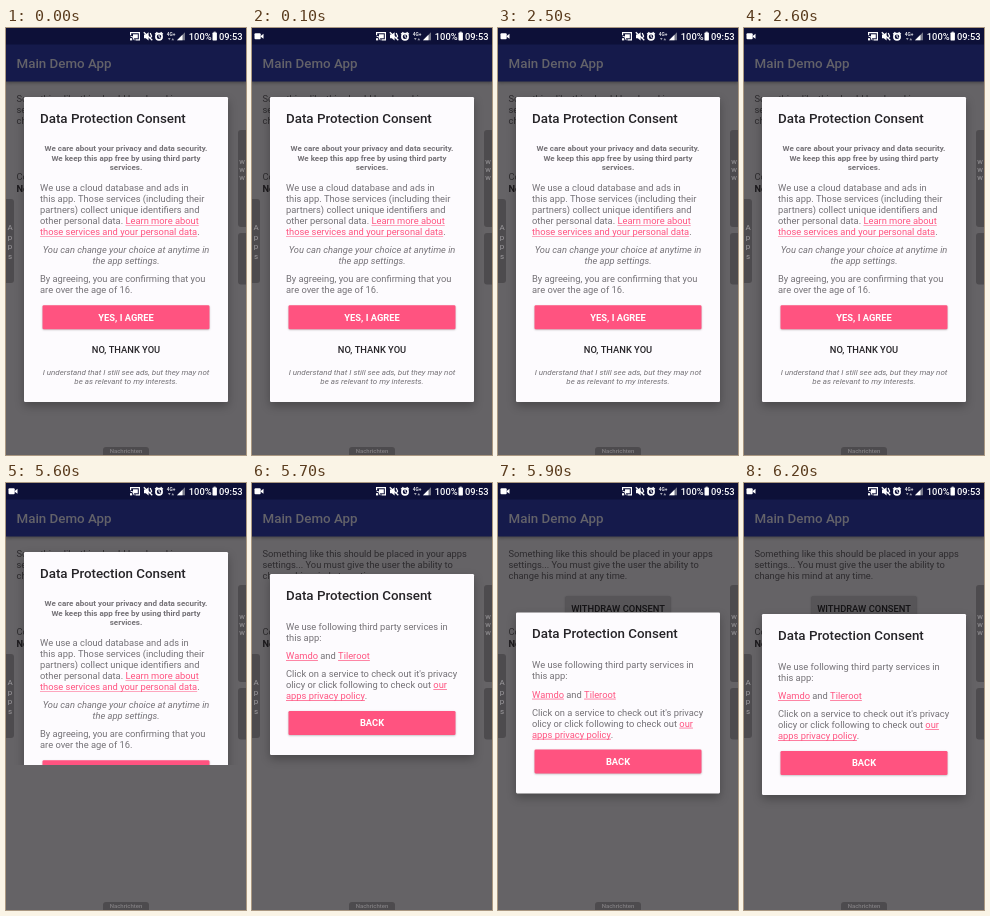
Write an HTML page with a canvas that moves like this. It is 240 px wide and 427 px high and loops after 8 s.

```html
<!DOCTYPE html>
<html lang="en">
<head>
<meta charset="utf-8">
<title>Consent dialog</title>
<style>
html, body { margin: 0; width: 100%; height: 100%; overflow: hidden; background: #656366; }
canvas { display: block; width: 100vw; height: 100vh; }
</style>
</head>
<body>
<canvas id="stage"></canvas>
<script>
const W = 240, H = 427, LOOP = 8000;
const PINK = '#ff5380', BODY = '#747176', INK = '#262428', PAPER = '#fdfbfe';
const canvas = document.getElementById('stage');
const ctx = canvas.getContext('2d');

const font = (size, style = '') => `${style} ${size}px Roboto, "Open Sans", sans-serif`;
const NORMAL = font(9.33);
const MEDIUM = font(9.33, '500');
const BOLD = font(9.33, '700');
const TITLE = font(13.33, '500');

function text(str, x, y, f, color, align = 'left') {
  ctx.font = f;
  ctx.fillStyle = color;
  ctx.textAlign = align;
  ctx.fillText(str, x, y);
}

function rect(x, y, w, h, color, r = 0) {
  ctx.fillStyle = color;
  ctx.beginPath();
  ctx.roundRect(x, y, w, h, r);
  ctx.fill();
}

function poly(color, ...pts) {
  ctx.fillStyle = color;
  ctx.beginPath();
  for (let i = 0; i < pts.length; i += 2) ctx.lineTo(pts[i], pts[i + 1]);
  ctx.fill();
}

function line(width, ...pts) {
  ctx.strokeStyle = '#fff';
  ctx.lineWidth = width;
  ctx.beginPath();
  for (let i = 0; i < pts.length; i += 2) ctx.lineTo(pts[i], pts[i + 1]);
  ctx.stroke();
}

function shadow(blur, dy, alpha, draw) {
  const scale = ctx.getTransform().a;
  ctx.save();
  ctx.shadowColor = `rgba(0,0,0,${alpha})`;
  ctx.shadowBlur = blur * scale;
  ctx.shadowOffsetY = dy * scale;
  draw();
  ctx.restore();
}

// Underscores enclose links.
function rich(str, x, y) {
  str.split('_').forEach((run, i) => {
    const link = i % 2 === 1;
    text(run, x, y, NORMAL, link ? PINK : BODY);
    const w = ctx.measureText(run).width;
    if (link) rect(x, y + 1.1, w, 0.7, PINK);
    x += w;
  });
}

function pinkButton(label, y) {
  shadow(2, 0.8, 0.25, () => rect(36.5, y, 167, 24, PINK, 1.3));
  text(label, 120, y + 15.3, BOLD, '#fff', 'center');
}

function statusBar(recording) {
  rect(0, 0, W, 16.5, '#0d1038');
  if (recording) {
    rect(2.5, 5.3, 6.2, 6, '#fff', 1);
    poly('#fff', 8.7, 8, 11.5, 5.8, 11.5, 10.8, 8.7, 8.8);
  }
  // screen cast
  line(1.2, 124.6, 7, 124.6, 4.6, 133.4, 4.6, 133.4, 11.9, 129.5, 11.9);
  line(1, 124.4, 8, 127, 9, 128.2, 12.2);
  rect(124, 10.2, 2.2, 2.2, '#fff');
  rect(127, 6.3, 4.8, 4, '#fff');
  // muted speaker
  poly('#fff', 138, 6.6, 139.8, 6.6, 142.6, 4.2, 142.6, 12.4, 139.8, 10.2, 138, 10.2);
  line(1.3, 137.8, 4.3, 146.3, 12.3);
  line(1.2, 144.2, 5, 145.6, 8.2, 144.4, 10);
  // alarm
  ctx.lineWidth = 1.7;
  ctx.strokeStyle = '#fff';
  ctx.beginPath();
  ctx.arc(153, 8.7, 3.1, 0, 7);
  ctx.stroke();
  line(1, 153, 6.8, 153, 8.9, 154.4, 9.5);
  line(1.5, 149.2, 6.2, 151.4, 4.3);
  line(1.5, 156.8, 6.2, 154.6, 4.3);
  // network
  const dim = '#a4a5b2';
  text('4G+', 165, 7.6, font(4.8, '700'), '#dedee4', 'center');
  poly(dim, 162, 10, 164.6, 10, 163.3, 12.3);
  poly(dim, 165.5, 12.3, 168.1, 12.3, 166.8, 10);
  poly('#767889', 171, 12.2, 179, 12.2, 179, 4.2);
  poly('#fff', 171, 12.2, 176.5, 12.2, 176.5, 6.7);
  text('100%', 182.8, 12.2, font(9.33, '500'), '#fff');
  rect(206.5, 4.6, 4.4, 7.8, '#fff', 0.6);
  rect(207.7, 3.7, 2, 1, '#fff');
  text('09:53', 236.6, 12.2, font(9.33, '500'), '#fff', 'right');
}

function page(recording) {
  rect(0, 0, W, H, '#656366');
  shadow(3, 1, 0.3, () => rect(0, 16, W, 37.5, '#151a4b'));
  text('Main Demo App', 10.5, 39.5, TITLE, '#636269');
  statusBar(recording);

  const ink = '#2d2b2e';
  ['Something like this should be placed in your apps',
   'settings... You must give the user the ability to',
   'change his mind at any time.'
  ].forEach((s, i) => text(s, 10.5, 74.3 + i * 11, NORMAL, ink));
  shadow(2, 0.8, 0.3, () => rect(67.5, 113, 105, 24, '#575558', 1.3));
  text('WITHDRAW CONSENT', 120, 128.8, MEDIUM, '#131214', 'center');
  text('Consent:', 10.5, 151.5, NORMAL, ink);
  text('Not given', 10.5, 164, BOLD, '#1b191c');
}

function edgePanels() {
  const grey = '#4d4b4e', light = '#9b999c';
  rect(-4, 171, 12, 84, grey, 3);
  rect(232, 102, 12, 97, grey, 3);
  rect(232, 205, 12, 51.5, grey, 3);
  [...'Apps'].forEach((c, i) => text(c, 4, 202 + i * 9.6, font(8), light, 'center'));
  [...'www'].forEach((c, i) => text(c, 236, 136.4 + i * 8, font(7.5), light, 'center'));
  rect(97, 419, 46, 12, grey, 3);
  text('Nachrichten', 120, 425.3, font(6, '500'), '#817f82', 'center');
}

function dialog(top, height, content, visible = H) {
  ctx.save();
  ctx.beginPath();
  ctx.rect(0, 0, W, visible);
  ctx.clip();
  shadow(10, 4, 0.28, () => rect(18, top, 204, height, PAPER, 1.3));
  ctx.translate(0, top);
  text('Data Protection Consent', 34, 25.9, TITLE, INK);
  content();
  ctx.restore();
}

function consent() {
  const centred = (lines, y, step, f) =>
    lines.forEach((s, i) => text(s, 120, y + i * step, f, BODY, 'center'));

  centred(['We care about your privacy and data security.',
    'We keep this app free by using third party',
    'services.'], 54.2, 9.5, font(8, '700'));
  ['We use a cloud database and ads in',
   'this app. Those services (including their',
   'partners) collect unique identifiers and',
   'other personal data. _Learn more about_',
   '_those services and your personal data_.'
  ].forEach((s, i) => rich(s, 34, 93.8 + i * 11));
  centred(['You can change your choice at anytime in', 'the app settings.'],
    156, 11, font(9.33, 'italic'));
  rich('By agreeing, you are confirming that you', 34, 185);
  rich('are over the age of 16.', 34, 196);
  pinkButton('YES, I AGREE', 208.3);
  text('NO, THANK YOU', 120, 255.8, MEDIUM, INK, 'center');
  centred(['I understand that I still see ads, but they may not',
    'be as relevant to my interests.'], 277.5, 9.4, font(8, 'italic'));
}

function services() {
  rich('We use following third party services in', 34, 56);
  rich('this app:', 34, 67);
  rich('_Wamdo_ and _Tileroot_', 34, 85.2);
  rich('Click on a service to check out it\'s privacy', 34, 103.2);
  rich('olicy or click following to check out _our_', 34, 114.2);
  rich('_apps privacy policy_.', 34, 125.2);
  pinkButton('BACK', 137);
}

function draw(t) {
  page(t >= 100);
  if (t < 5600) dialog(69, 305, consent);
  else if (t < 5700) dialog(69, 305, consent, 282);
  else {
    const step = Math.floor((t - 5700) / 100);
    dialog(131 - 40 * 0.2 ** step, 181, services);
  }
  edgePanels();
}

const start = performance.now();
function tick() {
  const dpr = window.devicePixelRatio || 1;
  const w = Math.round(innerWidth * dpr), h = Math.round(innerHeight * dpr);
  if (canvas.width !== w || canvas.height !== h) {
    canvas.width = w;
    canvas.height = h;
  }
  ctx.setTransform(w / W, 0, 0, h / H, 0, 0);
  draw((performance.now() - start) % LOOP);
  requestAnimationFrame(tick);
}
tick();
</script>
</body>
</html>
```
